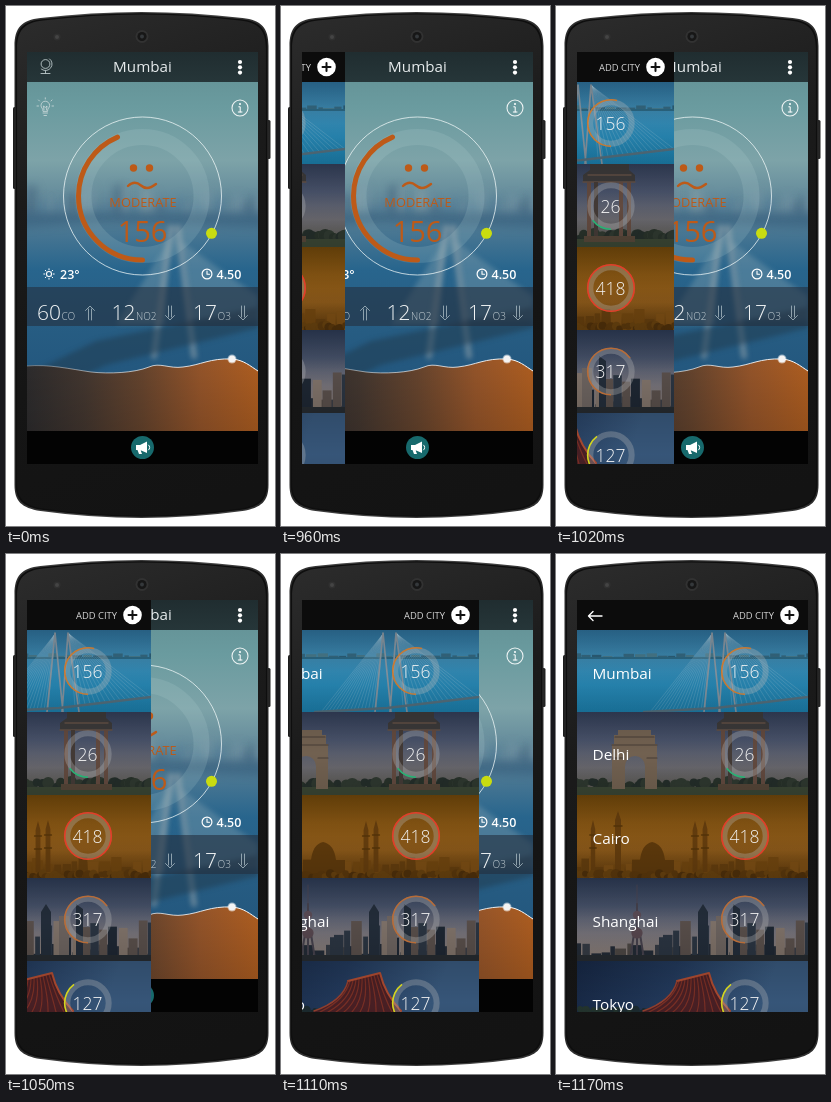
Animation, 269 px wide and 520 px high, one loop 1870 ms. Source, as an HTML page with a canvas:

```html
<!DOCTYPE html>
<html lang="en">
<head>
<meta charset="utf-8">
<title>Air quality app</title>
<style>
html, body { margin: 0; width: 100%; height: 100%; overflow: hidden; background: #fff; }
canvas { display: block; width: 269px; height: 520px; }
</style>
</head>
<body>
<canvas id="stage"></canvas>
<script>
const W = 269, H = 520, LOOP = 1870;
const SLIDE_AT = 930, STEP = 30, STEPS = 8, STEP_X = 26.8;
const ORANGE = '#bd5a18', FACE = '"Open Sans", "Noto Sans", sans-serif';
const SCREEN = { x: 21, y: 46, w: 231, h: 412 };
const dpr = Math.max(1, window.devicePixelRatio || 1);
let c;

function layer(paint, canvas = document.createElement('canvas')) {
  canvas.width = W * dpr;
  canvas.height = H * dpr;
  c = canvas.getContext('2d');
  c.scale(dpr, dpr);
  paint();
  return canvas;
}
function box(x, y, w, h, fill) { c.fillStyle = fill; c.fillRect(x, y, w, h); }
function round(x, y, w, h, r, fill) {
  c.beginPath(); c.roundRect(x, y, w, h, r); c.fillStyle = fill; c.fill();
}
function disc(x, y, r, fill) {
  c.beginPath(); c.arc(x, y, r, 0, 7); c.fillStyle = fill; c.fill();
}
function arc(x, y, r, from, to, color, width, cap = 'butt') {
  c.beginPath();
  c.arc(x, y, r, from * Math.PI / 180, to * Math.PI / 180);
  c.strokeStyle = color; c.lineWidth = width; c.lineCap = cap; c.stroke();
}
function ring(x, y, r, color, width) { arc(x, y, r, 0, 360, color, width); }
function path(d, color, width = 1) {
  c.strokeStyle = color; c.lineWidth = width; c.lineCap = c.lineJoin = 'round';
  c.stroke(new Path2D(d));
}
function shape(d, fill) { c.fillStyle = fill; c.fill(new Path2D(d)); }
function text(s, x, y, size, color, weight = 400, align = 'left') {
  c.font = `${weight} ${size}px ${FACE}`;
  c.fillStyle = color; c.textAlign = align; c.fillText(s, x, y);
}
function shade(x0, y0, x1, y1, ...colors) {
  const g = c.createLinearGradient(x0, y0, x1, y1);
  colors.forEach((k, i) => g.addColorStop(i / (colors.length - 1), k));
  return g;
}
function clip(x, y, w, h, paint) {
  c.save(); c.beginPath(); c.rect(x, y, w, h); c.clip(); paint(); c.restore();
}
function random(seed) {
  return () => (seed = (seed * 16807) % 2147483647) / 2147483647;
}
function towers(seed, x0, x1, base, low, high, colors) {
  const rnd = random(seed);
  for (let x = x0; x < x1;) {
    const w = 4 + rnd() * 7, h = low + rnd() * (high - low);
    box(x, base - h, w, h, colors[Math.floor(rnd() * colors.length)]);
    x += w + rnd() * 2;
  }
}
function trees(seed, x0, x1, y, size, colors) {
  const rnd = random(seed);
  for (let x = x0; x < x1; x += 2 + rnd() * 4) {
    disc(x, y + rnd() * size, size * (.5 + rnd() * .6), colors[Math.floor(rnd() * colors.length)]);
  }
}

// Phone outline with bowed ends, shrunk by n on every side.
function body(n, fill) {
  const l = 8.5 + n, r = 262.5 - n, t = 13 + n, b = 506 - n;
  shape(`M${l} ${t + 27}C${l} ${t + 9} ${l + 7} ${t + 1} ${l + 26} ${t - 1}`
    + `Q135.5 ${t - 13} ${r - 26} ${t - 1}C${r - 7} ${t + 1} ${r} ${t + 9} ${r} ${t + 27}`
    + `V${b - 27}C${r} ${b - 11} ${r - 7} ${b - 4} ${r - 26} ${b - 1}`
    + `Q135.5 ${b + 13} ${l + 26} ${b - 1}C${l + 7} ${b - 4} ${l} ${b - 11} ${l} ${b - 27}Z`, fill);
}
function phone() {
  box(0, 0, W, H, '#fff');
  round(7, 101, 4, 82, 1.5, '#1c1c1c');
  round(260, 114, 4.5, 39, 1.5, '#222');
  body(0, shade(9, 0, 263, 0, '#2b2b2b', '#454545', '#3a3a3a', '#454545', '#2b2b2b'));
  body(1.2, '#0e0e0e');
  body(2.6, shade(9, 14, 200, 500, '#2c2c2c', '#1b1b1b', '#151515', '#131313'));
  disc(51, 31, 3.6, '#303030');
  disc(51, 31, 2, '#444');
  disc(136, 30.5, 6.5, '#323232');
  disc(136, 30.5, 4.6, '#171717');
  disc(136, 30.5, 2, '#34383b');
}

function photo() {
  box(21, 46, 231, 412, shade(0, 46, 0, 426, '#608d91', '#6a9b9f', '#7da3a8', '#587f95', '#28658d', '#275d83', '#23577e', '#204c6c'));
  c.save();
  c.filter = `blur(${4.5 * dpr}px)`;
  c.globalAlpha = .55;
  towers(41, 15, 260, 207, 6, 28, ['#7997a6', '#91a4a8', '#537f99', '#405f7a']);
  c.globalAlpha = .4;
  shape('M10 206H260V222L100 216L10 222Z', '#274e70');
  c.restore();
  c.save();
  c.filter = `blur(${2.6 * dpr}px)`;
  c.globalAlpha = .38;
  shape('M163 235L110 318H158Z M174 235L252 290V314H184Z', '#87a2b1');
  c.globalAlpha = .55;
  path('M165 222L148 350M172 222L188 350', '#95a5ab', 6);
  shape('M10 374L90 335L252 301V322L100 359L10 402Z', '#223c51');
  c.restore();
}

function arrow(x, up) {
  c.save();
  c.translate(x, 307);
  if (!up) c.scale(1, -1);
  path('M-1.5 7V-4M1.5 7V-4M-4.5 -2.5L0 -7L4.5 -2.5', '#a9bac3', .8);
  c.restore();
}
function gas(value, name, x, arrowX, up) {
  text(value, x, 314, 21, '#f0f3f4', 300);
  text(name, x + 24.5, 314, 10, '#c3ced4', 300);
  arrow(arrowX, up);
}

function graph() {
  const line = 'M21 360C43 358 64 363 85 366C103 368 128 367 143 361C154 356 163 363 177 361C195 359 204 352 226 353C238 354 244 360 252 365';
  shape(line + 'V425H21Z', shade(21, 0, 252, 0, 'rgba(45,42,42,.96)', 'rgba(68,53,44,.96)', 'rgba(104,67,42,.96)', 'rgba(151,84,39,.97)', '#ad5d20'));
  shape(line + 'V425H21Z', shade(0, 355, 0, 425, 'rgba(0,0,0,0)', 'rgba(0,0,0,.14)'));
  path(line, shade(21, 0, 252, 0, 'rgba(255,255,255,.3)', 'rgba(255,255,255,.65)', '#fff'), 1);
  disc(226, 353, 4.5, 'rgba(255,255,255,.5)');
  disc(226, 353, 3.5, '#f4f4f4');
}

function icons() {
  const pale = '#cfdbdc';
  ring(39.5, 58, 4.4, pale, .8);
  arc(39.5, 58, 6.5, -55, 135, pale, .8);
  path('M39.5 65V67M35 67.5H44', pale, .8);
  path('M37 105C37 102 35 102 35 99.5A4.3 4.3 0 0 1 43.6 99.5C43.6 102 41.5 102 41.5 105ZM37 107H41.5M38 109.5H40.5M38 104L37.5 100L39.3 101.5L41 100L40.5 104', pale, .8);
  path('M39.3 93V91.8M33.5 95L32.5 94M45 95L46 94M32.5 100H31M46 100H47.5', pale, .8);
  for (const y of [56, 61.3, 66.6]) disc(234, y, 2.1, '#fff');
  ring(234, 102, 8, '#edf3f3', 1.1);
  disc(234, 98, 1, '#fff');
  path('M232.8 100.8H234.2V106M232.3 106H236', '#fff', 1);
}

function dial() {
  const x = 136.5, y = 190;
  ring(x, y, 59, 'rgba(185,210,215,.17)', 16);
  ring(x, y, 79, 'rgba(240,247,247,.85)', .9);
  arc(x, y, 64, 90, 247, ORANGE, 5, 'round');
  disc(205.5, 227.3, 5.5, '#c9dc10');
  for (const ex of [127.5, 143.5]) disc(ex, 162, 3.7, ORANGE);
  path('M122 180C127 175 131 176 135 179.5C140 184 145 182 150 178', ORANGE, 2.4);
  text('MODERATE', 137, 201, 12.8, ORANGE, 400, 'center');
  text('156', 136.5, 235.5, 29, ORANGE, 400, 'center');
}

function weather() {
  ring(43, 268, 2.5, '#fff', 1.1);
  for (let i = 0; i < 8; i++) {
    const a = i * Math.PI / 4, u = Math.cos(a), v = Math.sin(a);
    path(`M${43 + 4.2 * u} ${268 + 4.2 * v}L${43 + 5.2 * u} ${268 + 5.2 * v}`, '#fff', 1);
  }
  text('23°', 54, 273, 12.5, '#fff', 600);
  ring(201, 268, 4.9, '#fff', 1.2);
  path('M201 265V268.3H203.5', '#fff', 1.1);
  text('4.50', 210.5, 273, 12.5, '#fff', 600);
}

function home() {
  photo();
  box(21, 46, 231, 30, shade(0, 46, 0, 76, '#202d30', '#263639'));
  text('Mumbai', 136.5, 66, 15.2, '#e6ebec', 400, 'center');
  icons();
  dial();
  weather();
  box(21, 281, 231, 39, 'rgba(35,48,62,.6)');
  gas('60', 'CO', 31, 84, true);
  gas('12', 'NO2', 105.5, 164, false);
  gas('17', 'O3', 187, 237, false);
  graph();
  box(21, 425, 231, 33, '#030303');
  disc(136.5, 441.5, 11.5, '#17696c');
  shape('M130 439H134L141 435.5V447L134 444H130Z M131.5 444H134.5L136 448H133Z', '#fff');
  path('M142.5 439A3 3 0 0 1 142.5 444', '#fff', 1);
}

function bridge() {
  box(21, 76, 231, 82, shade(0, 76, 0, 158, '#2d6f98', '#3c87ae', '#2889b6', '#1c7fac'));
  towers(7, 21, 252, 104, 1, 5, ['#34677f', '#477889', '#2b5d76']);
  box(21, 103, 231, 2, '#2b6681');
  for (let i = 0; i < 16; i++) {
    const k = i / 15;
    path(`M156 80L${95 + 54 * k} ${157 - 3 * k}M170 80L${176 + 76 * k} ${152 - 9 * k}`, 'rgba(165,200,215,.4)', .6);
  }
  path('M156 79L148 158M156 79L164 158M169 79L163 158M169 79L180 158', '#8795a0', 1.7);
  path('M88 158L160 154L252 143', '#54707f', 2.4);
}

function gate() {
  box(21, 158, 231, 83, shade(0, 158, 0, 241, '#333f59', '#4a546c', '#6b6a70', '#58564b'));
  trees(12, 18, 256, 228, 6, ['#252f2b', '#303a31', '#29332b']);
  box(21, 233, 231, 8, '#3b4735');
  shape('M62 176H95V181H99V190H101V235H89V212A10 10 0 0 0 69 212V235H56V190H58V181H62Z', '#756453');
  path('M56 191H101M59 183H98M57 204H67M91 204H101', '#4a3f38', 1.2);
  shape('M168 158H207V164L213 169V176H161V169L168 164Z', '#3d3b3b');
  path('M161 176H213M166 169H209', '#655247', 1.3);
  for (const x of [165, 172, 197, 205]) box(x, 176, 4, 56, x % 2 ? '#654c41' : '#453c38');
  box(162, 230, 51, 6, '#574739');
}

function minaret(x, top, w) {
  shape(`M${x} ${top}L${x + w} ${top + 9}V318H${x - w}V${top + 9}Z`, '#663e0e');
  path(`M${x - w - 1} ${top + 15}h${2 * w + 2}M${x - w - 1} ${top + 28}h${2 * w + 2}`, '#553408', 1.4);
}
function mosque() {
  box(21, 241, 231, 83, shade(0, 241, 0, 324, '#70470a', '#875613', '#8b591a', '#5d390c'));
  towers(31, 21, 252, 324, 10, 22, ['#71460f', '#643e0e', '#7c4e14']);
  minaret(37, 266, 2.2);
  minaret(62, 257, 3);
  minaret(139, 267, 2.4);
  minaret(149, 266, 2.4);
  shape('M76 322V306H84Q86 290 96 288Q107 290 109 306H118V322Z', '#5f3a0c');
  trees(5, 18, 256, 319, 5, ['#4f300a', '#5b380c', '#68420f']);
}

function skyline() {
  box(21, 324, 231, 83, shade(0, 324, 0, 407, '#2c3a54', '#455067', '#76737a', '#8f8076'));
  towers(91, 21, 252, 407, 7, 18, ['#353b44', '#4c4744', '#232b36']);
  towers(24, 103, 250, 407, 20, 44, ['#2b3542', '#594f4b', '#1e2733', '#80736a']);
  shape('M142 407V358L147 350L152 358V407Z M177 407V350L184 355V407Z', '#232d3a');
  box(160, 362, 10, 45, '#6d6460');
  path('M81 331V350', '#4a4654', 1);
  path('M81 350V403M78 380L74 405M84 380L88 405', '#45414c', 2);
  disc(81, 361, 4.2, '#5a4b55');
  disc(81, 379, 5.6, '#57474f');
  box(21, 401, 231, 6, '#262b30');
}

function pagoda() {
  box(21, 407, 231, 51, shade(21, 407, 200, 470, '#172845', '#22395b', '#38587c'));
  trees(18, 24, 100, 455, 4, ['#1c2b30', '#24352f']);
  const roof = 'M121 427L153 419Q158 440 174 458H86Q116 447 121 427Z';
  shape(roof, '#4a2025');
  for (let i = 0; i < 10; i++) path(`M${123 + i * 3} ${427 - i * .7}Q${118 + i * 4.5} 446 ${93 + i * 8} 458`, '#7c3026', 1.2);
  path('M121 427L153 419Q158 440 174 457', '#b04c31', 2);
  path('M121 427Q116 447 87 457', '#96402f', 1.4);
}

const cities = [
  // name, value, top, ring centre, baseline, arc colour, arc start, arc end, scene
  ['Mumbai', 156, 76, 117, 124.5, '#c87931', 90, 285, bridge],
  ['Delhi', 26, 158, 200, 205.5, '#28b174', 90, 142, gate],
  ['Cairo', 418, 241, 282, 289.5, '#e33d28', 0, 360, mosque],
  ['Shanghai', 317, 324, 365.5, 373, '#b86c37', 90, 325, skyline],
  ['Tokyo', 127, 407, 449, 456, '#d4d51d', 115, 233, pagoda]
];

function cityRow([name, value, top, mid, base, color, from, to, scene]) {
  clip(21, top, 231, Math.min(83, 458 - top), () => {
    scene();
    box(21, top, 231, 83, shade(0, top, 0, top + 83, 'rgba(0,0,0,.14)', 'rgba(0,0,0,.03)', 'rgba(0,0,0,.14)'));
    ring(189, mid, 20.7, 'rgba(185,185,185,.32)', 6);
    arc(189, mid, 23.3, from, to, color, 1.6);
    text(value, 188.5, mid + 6.5, 17.5, '#f4f4f4', 300, 'center');
    text(name, 36.5, base, 15.3, '#fff');
  });
}

function menu() {
  box(21, 46, 231, 412, '#0c0c0c');
  cities.forEach(cityRow);
  path('M46 62H32.5M37 57.5L32.5 62L37 66.5', '#fff', 1.4);
  text('ADD CITY', 218, 64.5, 9.4, '#d5d5d5', 400, 'right');
  disc(233.5, 61, 9.3, '#fff');
  path('M229.5 61H237.5M233.5 57V65', '#111', 2);
}

function start() {
  const base = layer(() => {
    phone();
    clip(SCREEN.x, SCREEN.y, SCREEN.w, SCREEN.h, home);
  });
  const panel = layer(() => clip(SCREEN.x, SCREEN.y, SCREEN.w, SCREEN.h, menu));
  layer(() => {}, document.getElementById('stage'));
  const view = c, began = performance.now();

  function frame(now) {
    const t = Math.max(0, now - began) % LOOP;
    c = view;
    c.drawImage(base, 0, 0, W, H);
    if (t >= SLIDE_AT) {
      const step = Math.min(STEPS, Math.floor((t - SLIDE_AT) / STEP));
      clip(SCREEN.x, SCREEN.y, SCREEN.w, SCREEN.h, () =>
        c.drawImage(panel, Math.round((step - STEPS) * STEP_X), 0, W, H));
    }
    requestAnimationFrame(frame);
  }
  frame(began);
}
start();
</script>
</body>
</html>
```
